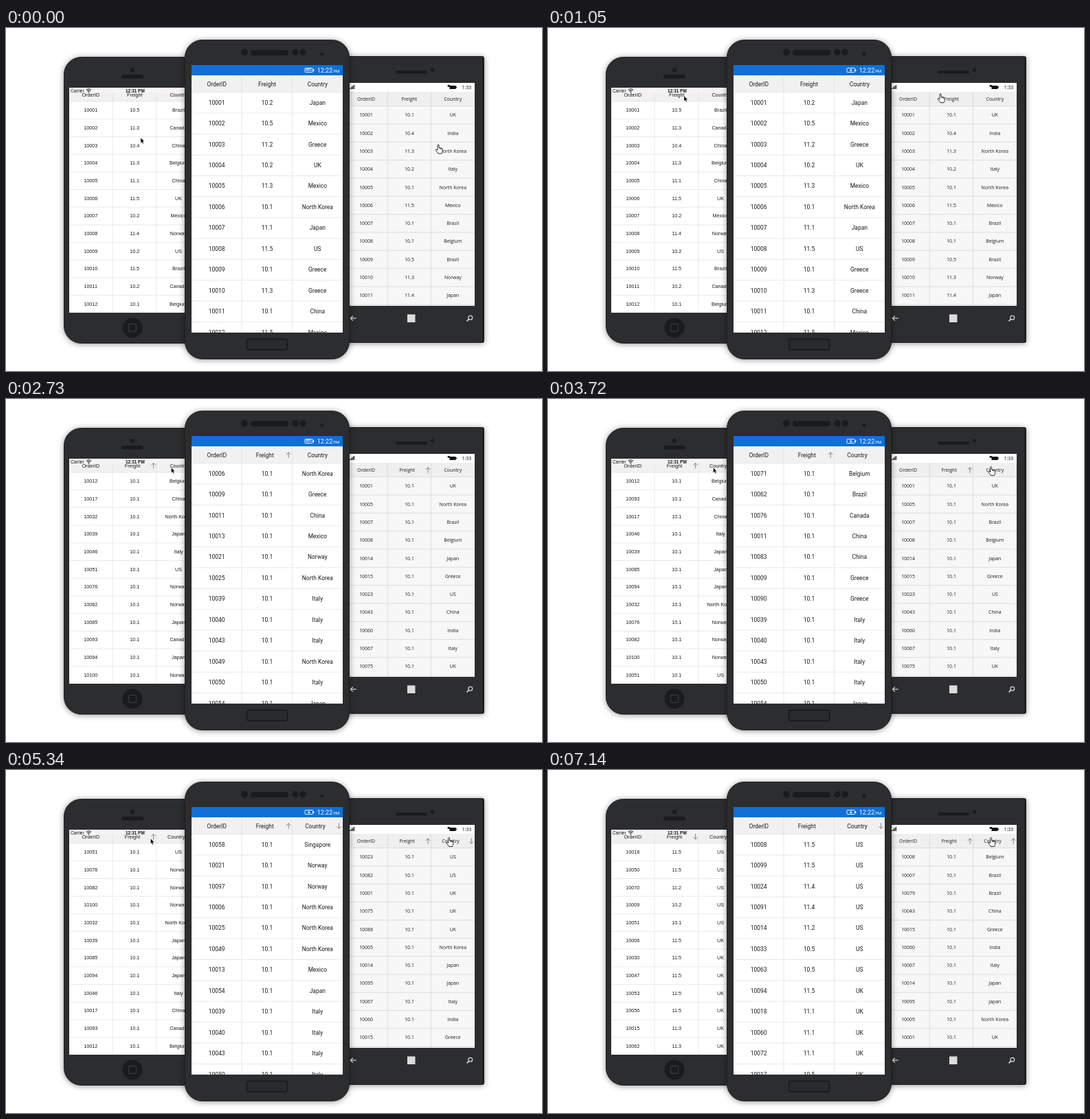
An HTML page that plays this animation: 780 px wide and 500 px high, repeating every 7350 ms.

```html
<!DOCTYPE html>
<html lang="en">
<head>
<meta charset="utf-8">
<title>Sorting grids</title>
<style>
html, body { margin: 0; width: 100%; height: 100%; overflow: hidden; background: #fff; }
svg { display: block; }
#stage { position: absolute; left: 0; top: 0; }
.phone { filter: drop-shadow(0 1px 4px rgba(0, 0, 0, .42)); }
.body { fill: #2b2d2f; stroke: #1d1f20; }
.dark { fill: #191b1c; }
.left text { font-family: "Liberation Sans", Arial, sans-serif; }
.mid text { font-family: Roboto, sans-serif; }
.right text { font-family: "Open Sans", "Noto Sans", sans-serif; }
.sort { fill: none; stroke: #777; stroke-width: .9; }
</style>
</head>
<body>
<svg id="stage" width="780" height="500" viewBox="0 0 780 500">
  <g class="left">
    <g class="phone">
      <rect class="body" x="84.5" y="42.5" width="200" height="417" rx="25"/>
      <circle class="dark" cx="184" cy="61" r="3.2"/>
      <rect class="dark" x="168" y="68" width="32" height="5.5" rx="2.7"/>
      <circle class="dark" cx="184" cy="437" r="14.5"/>
      <rect x="178.5" y="431.5" width="11" height="11" rx="2" fill="none" stroke="#35383a" stroke-width="1.3"/>
    </g>
    <svg id="left" x="92" y="87" width="170" height="328" viewBox="92 87 170 328"></svg>
    <g fill="#111">
      <text x="94" y="93.5" font-size="6.4">Carrier</text>
      <text x="174" y="93.6" font-size="6.4" font-weight="bold">12:31 PM</text>
      <path d="M116.8 90.3q3.6-3 7.2 0M118.2 91.9q2.2-1.8 4.4 0" fill="none" stroke="#111" stroke-width="1.1"/>
      <circle cx="120.4" cy="93.4" r=".9"/>
    </g>
    <path id="arrow" d="M0 0V7.6L1.7 6.1 2.9 8.8 4.2 8.2 3 5.6 5.3 5.5Z" fill="#000" stroke="#fff" stroke-width=".35"/>
  </g>

  <g class="right">
    <g class="phone">
      <rect class="body" x="480" y="41.5" width="215.5" height="417" rx="2"/>
      <rect class="dark" x="567" y="62" width="46" height="4.5" rx="2"/>
      <circle class="dark" cx="620.5" cy="61" r="2.7"/>
    </g>
    <path d="M694.2 43V458" stroke="#1b1d1e" stroke-width="1.6"/>
    <svg id="right" x="490" y="80" width="192" height="325" viewBox="490 80 192 325"></svg>
    <g fill="#111">
      <path d="M500 89h1v-1h-1zM501.5 89h1v-2.4h-1zM503 89h1v-3.8h-1zM504.5 89h1v-5h-1zM506 89h1v-6h-1z"/>
      <path d="M645.5 84h9v1.2h1.3v2.4h-1.3V89h-9zM642.7 83h3.2v2.8h-3.2z"/>
      <text x="663.4" y="88.9" font-size="7">1:33</text>
    </g>
    <path d="M509.5 423.2h-8M504.8 419.8L501.4 423.2L504.8 426.6" fill="none" stroke="#ddd" stroke-width="1.3"/>
    <rect x="584" y="417.5" width="11.5" height="11.5" fill="#dcdcdc"/>
    <path d="M673.6 424.4L670.6 427.4" stroke="#ddd" stroke-width="1.5"/>
    <circle cx="675.8" cy="422.2" r="2.9" fill="none" stroke="#ddd" stroke-width="1.2"/>
    <path id="hand" d="M3.6 7.2V1.5q0-1 1-1t1 1V5l3.6.7q1.5.3 1.5 1.7v2.2q0 2-1.2 3.9H4.4Q3.6 11.500.8 8.800.4 7.800 1.400 7.400 2.400 7.300 3.600 8.600ZM7.200 5.500V7.200M9 6V7.400" fill="#fff" stroke="#111" stroke-width=".9"/>
  </g>

  <g class="mid">
    <g class="phone">
      <rect class="body" x="260.5" y="17.5" width="239" height="465" rx="25"/>
      <rect class="dark" x="356" y="32" width="55" height="8" rx="4"/>
      <circle class="dark" cx="347" cy="35.500" r="5"/>
      <circle class="dark" cx="421" cy="35.500" r="4.700"/>
      <circle class="dark" cx="432" cy="35.500" r="4.700"/>
      <circle class="dark" cx="460" cy="38" r="2.500"/>
      <rect x="350.500" y="453.500" width="59" height="15.500" rx="3" fill="#282b2c" stroke="#141617" stroke-width="1.300"/>
    </g>
    <svg id="mid" x="270" y="54" width="220" height="390" viewBox="270 54 220 390"></svg>
    <g fill="#fff">
      <rect x="435" y="58.500" width="11.500" height="6" rx="1" fill="none" stroke="#fff" stroke-width=".9"/>
      <path d="M447 60.200h1.300v2.700h-1.300z"/>
      <text id="level" x="440.700" y="63.400" font-size="4.800" font-weight="bold" text-anchor="middle">95%</text>
      <path id="bolt" d="M441.600 59L438.500 62H440.600L440 64.200L443.200 61.200H441Z"/>
      <text x="452.800" y="65.200" font-size="9">12:22</text>
      <text x="476.200" y="65.200" font-size="6">PM</text>
    </g>
  </g>
</svg>
<script>
const LOOP = 7350, STEP = 30;
const $ = id => document.getElementById(id);
const COUNTRY = {
  Be: 'Belgium', Br: 'Brazil', Ca: 'Canada', Ch: 'China', Gr: 'Greece', In: 'India', It: 'Italy', Ja: 'Japan',
  Me: 'Mexico', NK: 'North Korea', No: 'Norway', Si: 'Singapore', UK: 'UK', US: 'US'
};

// Rows are written "id country freight"; the freight defaults to 10.1.
const parse = list => list.split(',').map(row => {
  const [id, code, freight = '10.1'] = row.trim().split(' ');
  return [String(10000 + +id), freight, COUNTRY[code]];
});
const byCountry = (rows, dir) =>
  [...rows].sort((a, b) => dir * (a[2] < b[2] ? -1 : a[2] > b[2] ? 1 : 0));

function el(parent, tag, attrs, text) {
  const node = document.createElementNS('http://www.w3.org/2000/svg', tag);
  for (const key in attrs) node.setAttribute(key, attrs[key]);
  if (text) node.textContent = text;
  return parent.appendChild(node);
}

// Sort marks: '' none, 'n' room kept for an arrow, 'u' up, 'd' down.
function buildState(g, root, [, rows, freightMark, countryMark]) {
  const group = el(root, 'g', { fill: '#1a1a1a', 'font-size': g.size, 'text-anchor': 'middle' });
  const put = (x, y, text) => el(group, 'text', { x, y: y + g.size * .36 }, text);
  const marks = ['', freightMark, countryMark];
  ['OrderID', 'Freight', 'Country'].forEach((title, i) => {
    const mark = marks[i];
    put(g.cols[i] - (mark ? 3.3 : 0), g.headText, title);
    if (mark === 'u' || mark === 'd') {
      const flip = mark === 'u' ? 1 : -1;
      el(group, 'path', {
        class: 'sort', d: 'M0 4.2V-3.8M-3.2-.6L0-3.8L3.2-.6',
        transform: `translate(${g.cols[i] + g.mark} ${g.headText}) scale(1 ${flip})`
      });
    }
  });
  rows.slice(0, 12).forEach((row, r) =>
    row.forEach((text, i) => put(g.cols[i], g.first + r * g.pitch, text)));
  return group;
}

function buildGrid(g) {
  const root = $(g.id), { x, y, width: w, height: h } = root.viewBox.baseVal;
  const rect = (top, height, fill) => el(root, 'rect', { x, y: top, width: w, height, fill });
  const line = (d, stroke) => el(root, 'path', { d, stroke, 'stroke-width': .8 });
  rect(y, h, g.fill);
  rect(y, g.head - y, g.bar);
  rect(g.head, g.top - g.head, g.headFill);
  for (let r = 0; r < 12; r++) line(`M${x} ${g.top + r * g.pitch}h${w}`, g.line);
  g.splits.forEach(sx => line(`M${sx} ${g.head}V${y + h}`, g.line));
  g.groups = g.states.map(state => buildState(g, root, state));
}

const leftStart = parse('1 Br 10.5,2 Ca 11.3,3 Ch 10.4,4 Be 11.3,5 Ch 11.1,6 UK 11.5,7 Me 10.2,8 No 11.4,9 US 10.2,10 Br 11.5,11 Ca 10.2,12 Be');
const leftLow = parse('12 Be,17 Ch,32 NK,39 Ja,46 It,51 US,76 No,82 No,85 Ja,93 Ca,94 Ja,100 No');
const leftHigh = parse('18 US 11.5,50 US 11.5,70 US 11.2,9 US 10.2,51 US,6 UK 11.5,30 UK 11.5,47 UK 11.5,53 UK 11.5,56 UK 11.5,15 UK 11.3,62 UK 11.3');
const midStart = parse('1 Ja 10.2,2 Me 10.5,3 Gr 11.2,4 UK 10.2,5 Me 11.3,6 NK,7 Ja 11.1,8 US 11.5,9 Gr,10 Gr 11.3,11 Ch,12 Me 11.5');
const midLow = parse('6 NK,9 Gr,11 Ch,13 Me,21 No,25 NK,39 It,40 It,43 It,49 NK,50 It,54 Ja,58 Si,62 Br,71 Be,76 Ca,83 Ch,90 Gr,97 No');
const midHigh = parse('8 US 11.5,99 US 11.5,24 US 11.4,91 US 11.4,14 US 11.2,33 US 10.5,63 US 10.5,94 UK 11.5,18 UK 11.1,60 UK 11.1,72 UK 11.1,17 UK 10.5');
const rightStart = parse('1 UK,2 In 10.4,3 NK 11.3,4 It 10.2,5 NK,6 Me 11.5,7 Br,8 Be,9 Br 10.5,10 No 11.3,11 Ja 11.4');
const rightLow = parse('1 UK,5 NK,7 Br,8 Be,14 Ja,15 Gr,23 US,43 Ch,60 In,67 It,75 UK,79 Br,82 US,88 UK,95 Ja');
const midUp = byCountry(midLow, 1), midDown = byCountry(midLow, -1);
const rightUp = byCountry(rightLow, 1), rightDown = byCountry(rightLow, -1);

const grids = [
  {
    id: 'left', size: 7.2, cols: [123.3, 187.3, 251], splits: [155, 219], mark: 27.3,
    head: 93, headText: 97.2, top: 107, first: 119.6, pitch: 25.7,
    fill: '#fff', bar: '#f8f3f5', headFill: '#f1f1f1', line: '#e4e4e4',
    states: [
      [0, leftStart, '', ''],
      [1200, leftLow, 'n', ''],
      [1350, leftLow, 'u', ''],
      [2880, byCountry(leftLow, 1), 'u', 'n'],
      [4260, byCountry(leftLow, -1), 'u', 'n'],
      [5640, leftHigh, 'd', 'n']
    ]
  },
  {
    id: 'mid', size: 8.45, cols: [306.7, 380, 453.3], splits: [343, 416.5], mark: 31.2,
    head: 69, headText: 81.6, top: 93.6, first: 108.6, pitch: 30.45,
    fill: '#fff', bar: '#0f70d8', headFill: '#f1f1f1', line: '#e2e2e2',
    states: [
      [0, midStart, '', ''],
      [2250, midLow, 'n', ''],
      [2640, midLow, 'u', ''],
      [3720, midUp, 'u', 'n'],
      [4260, midUp, 'u', 'u'],
      [4800, midDown, 'u', 'n'],
      [5340, midDown, 'u', 'd'],
      [6930, midHigh, 'n', 'd']
    ]
  },
  {
    id: 'right', size: 6.9, cols: [524, 587, 650.3], splits: [555.5, 618.5], mark: 27,
    head: 93, headText: 103.6, top: 113.6, first: 126.7, pitch: 26.33,
    fill: '#f7f7f7', bar: '#fff', headFill: '#efefef', line: '#d6d6d6',
    states: [
      [0, rightStart, '', ''],
      [2010, rightLow, 'u', ''],
      [4080, rightUp, 'u', 'u'],
      [5070, rightDown, 'u', 'd'],
      [6780, rightUp, 'u', 'u']
    ]
  }
];
grids.forEach(buildGrid);

const smooth = p => p * p * (3 - 2 * p);
const out = p => 1 - (1 - p) ** 2;

// Each move: start, end, target x, target y, easing.
const arrowMoves = [
  [0, 0, 196, 160, out], [0, 540, 198, 99, smooth],
  [1740, 2250, 240.5, 100, out], [4800, 5340, 210.5, 100, out]
];
const handMoves = [
  [0, 0, 624.5, 169.5, out], [0, 540, 566.5, 95.3, smooth], [1170, 1350, 574, 99, out],
  [1980, 2250, 603, 99.3, smooth], [2460, 2460, 640, 98, out]
];

function place(node, moves, t) {
  let x = 0, y = 0;
  for (const [from, to, tx, ty, ease] of moves) {
    if (t < from) break;
    const p = to > from ? ease(Math.min(1, (t - from) / (to - from))) : 1;
    x += (tx - x) * p;
    y += (ty - y) * p;
  }
  node.setAttribute('transform', `translate(${x.toFixed(2)} ${y.toFixed(2)})`);
}

const within = (t, a, b) => t >= a && t < b;
const show = (node, on) => node.setAttribute('visibility', on ? 'visible' : 'hidden');

function render(time) {
  const t = Math.floor(time % LOOP / STEP) * STEP;
  for (const { states, groups } of grids) {
    const current = states.findLastIndex(state => state[0] <= t);
    groups.forEach((group, i) => show(group, i === current));
  }
  place($('arrow'), arrowMoves, t);
  place($('hand'), handMoves, t);
  $('arrow').setAttribute('opacity', Math.max(0, Math.min(1, (6390 - t) / 120)));
  show($('hand'), !within(t, 2460, 2910));
  const charging = within(t, 1050, 1590) || within(t, 3150, 5850) || t >= 6390;
  show($('bolt'), charging);
  show($('level'), !charging);
}

const start = performance.now();
function tick() {
  render(performance.now() - start);
  requestAnimationFrame(tick);
}
tick();
</script>
</body>
</html>
```
